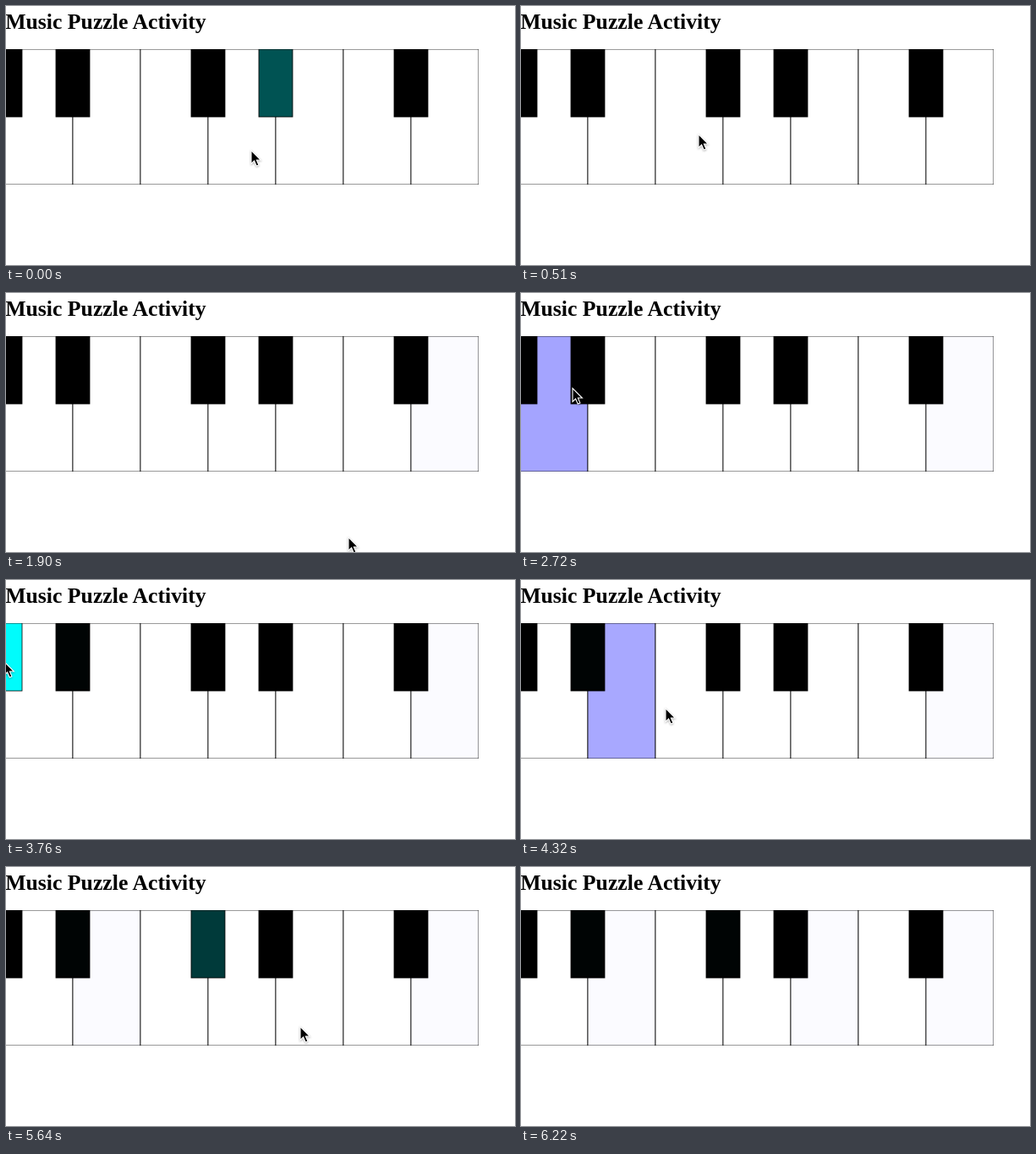
These frames come from a looping animation (602x306 px, 7660 ms). An HTML page:

```html
<!DOCTYPE html>
<html lang="en">
<head>
<meta charset="utf-8">
<title>Music Puzzle Activity</title>
<style>
  html, body { margin: 0; width: 100%; height: 100%; overflow: hidden; background: #fff; }
  #stage { display: block; width: 602px; height: 306px; }
  text { font: bold 25.75px "Liberation Serif", Times, serif; }
  rect { stroke: #000; stroke-width: .8px; }
  #cursor { filter: drop-shadow(0 1px 1px rgba(0, 0, 0, .3)); }
</style>
</head>
<body>
<svg id="stage" viewBox="0 0 602 306">
  <text x="-0.8" y="27">Music Puzzle Activity</text>
  <svg id="keys" x="-1" y="51" width="560" height="160" overflow="hidden"></svg>
  <path id="cursor" d="M1 1.6V17.4L4.6 14L7.2 20L9.9 18.9L7.4 13H12.4Z"
        fill="#000" stroke="#fff" stroke-width="1.1"/>
</svg>
<script>
const LOOP = 7660, FADE = 350, EXIT = 6205;
const SIZE = 80; // white key width, black key height

// time, key, rest of the pointer before the click
const presses = [
  [-235, 'D#', 0], [100, 'D', 0], [704, 'C', 0], [1530, 'G', 150],
  [2496, 'A', 0], [3070, 'A#', 150], [3757, 'G#', 170], [4090, 'B', 0],
  [4427, 'C', 0], [4860, 'D', 0], [5370, 'C#', 90], [5705, 'E', 0]
];
// Keys that never fade out completely
const faint = ['G', 'B', 'E', 'A#', 'C#'];

// Pointer places between clicks: time, x, y
const stops = [
  [0, 289, 169], [1010, 509, 274], [1180, 550, 250], [1850, 430, 288],
  [2270, 111, 224], [2720, 60, 111], [4740, 279, 80], [5640, 347, 187],
  [6110, 483, 271], [6150, 483, 271], [6210, 514, 310]
];

const keys = {};
const board = document.getElementById('keys');
const cursor = document.getElementById('cursor');

function addKey(name, x, sharp) {
  const el = document.createElementNS('http://www.w3.org/2000/svg', 'rect');
  const box = { x, y: 0, width: sharp ? SIZE / 2 : SIZE, height: sharp ? SIZE : SIZE * 2 };
  for (const k in box) el.setAttribute(k, box[k]);
  board.append(el);
  keys[name] = {
    el,
    rest: sharp ? [0, 0, 0] : [255, 255, 255],
    flash: sharp ? [0, 255, 255] : [0, 0, 255],
    spot: sharp ? [x + 17, 95] : [x + 35, 150]
  };
}
[...'ABCDEFG'].forEach((n, i) => addKey(n, i * SIZE, false));
[...'GA-CD-F'].forEach((n, i) => {
  if (n !== '-') addKey(n + '#', (i - .25) * SIZE, true);
});

const path = [...stops];
for (const [t, name, wait] of presses) {
  const spot = keys[name].spot;
  if (wait) path.push([t - wait, ...spot]);
  path.push([t, ...spot]);
}
path.sort((a, b) => a[0] - b[0]);

function keyColor(name, t) {
  const { rest, flash } = keys[name];
  const hit = presses.filter(p => p[1] === name && p[0] <= t).pop();
  if (!hit) return rest;
  const u = Math.min(faint.includes(name) ? .985 : 1, (t - hit[0]) / FADE);
  return flash.map((c, i) => Math.round(c + (rest[i] - c) * u));
}

const slope = (i, a) => (path[i + 1][a] - path[i][a]) / (path[i + 1][0] - path[i][0]);

// Monotone tangent: no overshoot, and full stops stay still
function tangent(i, a) {
  if (i === 0 || i === path.length - 1) return 0;
  const p = slope(i - 1, a), q = slope(i, a);
  return p * q <= 0 ? 0 : 2 * p * q / (p + q);
}

function pointer(t, a) {
  let i = 0;
  while (i < path.length - 2 && path[i + 1][0] <= t) i++;
  const h = path[i + 1][0] - path[i][0];
  const u = Math.min(1, (t - path[i][0]) / h), v = 1 - u;
  return path[i][a] * v * v * (1 + 2 * u) + path[i + 1][a] * u * u * (3 - 2 * u)
    + h * u * v * (tangent(i, a) * v - tangent(i + 1, a) * u);
}

function draw(t) {
  for (const n in keys) keys[n].el.setAttribute('fill', `rgb(${keyColor(n, t)})`);
  const x = Math.round(pointer(t, 1)), y = Math.round(pointer(t, 2));
  cursor.setAttribute('transform', `translate(${x} ${y})`);
  cursor.setAttribute('visibility', t < EXIT ? 'visible' : 'hidden');
}

const start = performance.now();
function tick() {
  draw((performance.now() - start) % LOOP);
  requestAnimationFrame(tick);
}
draw(0);
requestAnimationFrame(tick);
</script>
</body>
</html>
```
